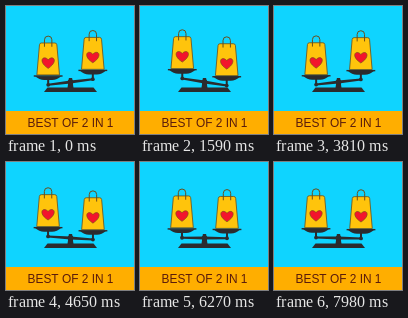
These frames come from a looping animation (128x128 px, 8000 ms). An HTML page with a canvas:

```html
<!DOCTYPE html>
<html lang="en">
<head>
<meta charset="utf-8">
<title>Best of 2 in 1</title>
<style>
  html, body { margin: 0; width: 100%; height: 100%; overflow: hidden; background: #0fd4ff; }
  canvas { display: block; width: 100vw; height: 100vh; }
</style>
</head>
<body>
<canvas id="stage"></canvas>
<script>
const SIZE = 128, LOOP = 8000, STEP = 30;
const SKY = '#0fd4ff', BAR = '#ffae00', INK = '#2b2b2e', TEXT = '#5a1c0c';
const BAG = '#ffc40c', EDGE = '#6a4f1a', HEART = '#f3142c';
const PIVOT = { x: 64.5, y: 76 }, ARM = 22.5;
const PERIOD = 3520, PEAK = 1830;

const canvas = document.getElementById('stage');
const ctx = canvas.getContext('2d');

function poly(points, fill) {
  ctx.beginPath();
  points.forEach(([x, y]) => ctx.lineTo(x, y));
  ctx.closePath();
  ctx.fillStyle = fill;
  ctx.fill();
}

function disc(x, y, r, fill) {
  ctx.beginPath();
  ctx.arc(x, y, r, 0, Math.PI * 2);
  ctx.fillStyle = fill;
  ctx.fill();
}

function handle() {
  ctx.beginPath();
  ctx.moveTo(-3.7, -28.5);
  ctx.lineTo(-3.7, -35.5);
  ctx.arc(0, -35.5, 3.7, Math.PI, 0);
  ctx.lineTo(3.7, -28.5);
  ctx.lineWidth = 1;
  ctx.stroke();
}

function heart(x, y) {
  ctx.beginPath();
  ctx.moveTo(x, y + 5.6);
  ctx.bezierCurveTo(x - 11, y - 1.5, x - 5, y - 8.5, x, y - 3);
  ctx.bezierCurveTo(x + 5, y - 8.5, x + 11, y - 1.5, x, y + 5.6);
  ctx.fillStyle = HEART;
  ctx.fill();
  ctx.lineWidth = 0.6;
  ctx.stroke();
}

// The origin is the middle of the bag's bottom edge.
function bag() {
  ctx.strokeStyle = EDGE;
  ctx.beginPath();
  ctx.moveTo(-11.3, -0.4);
  ctx.lineTo(-8.7, -30.5);
  ctx.quadraticCurveTo(-8.5, -32.3, -6.7, -32.3);
  ctx.lineTo(6.7, -32.3);
  ctx.quadraticCurveTo(8.5, -32.3, 8.7, -30.5);
  ctx.lineTo(11.3, -0.4);
  ctx.closePath();
  ctx.fillStyle = BAG;
  ctx.fill();
  ctx.lineWidth = 0.8;
  ctx.stroke();
  handle();
  heart(0, -12.5);
}

function pan(x, y) {
  ctx.save();
  ctx.translate(x, y);
  ctx.fillStyle = INK;
  ctx.fillRect(-1, -6, 2, 6);
  ctx.fillRect(-14.4, -9.5, 28.8, 1.4);
  ctx.beginPath();
  ctx.moveTo(-13, -8.5);
  ctx.quadraticCurveTo(-9, -4.8, -4, -4.8);
  ctx.lineTo(4, -4.8);
  ctx.quadraticCurveTo(9, -4.8, 13, -8.5);
  ctx.fill();
  disc(0, 0, 1.9, INK);
  ctx.translate(0, -9.5);
  bag();
  ctx.restore();
}

function stand() {
  const { x, y } = PIVOT;
  poly([[x - 1.6, y - 4], [x + 1.6, y - 4], [x + 3, y + 6], [x - 3, y + 6]], INK);
  poly([[x - 23, y + 5.5], [x + 23, y + 5.5], [x + 26.5, y + 10], [x - 26.5, y + 10]], INK);
}

function beam(angle) {
  ctx.save();
  ctx.translate(PIVOT.x, PIVOT.y);
  ctx.rotate(angle);
  poly([[-ARM, -1], [0, -1.6], [ARM, -1], [ARM, 1], [0, 1.6], [-ARM, 1]], INK);
  disc(0, 0, 2.8, INK);
  ctx.restore();
}

// A positive angle lifts the left pan.
function tilt(t) {
  const wave = Math.cos((t - PEAK) / PERIOD * Math.PI * 2);
  return (1.3 + 8.5 * wave) * Math.PI / 180;
}

function caption() {
  ctx.fillStyle = BAR;
  ctx.fillRect(0, 105, SIZE, 23);
  ctx.fillStyle = TEXT;
  ctx.font = '11.9px "Liberation Sans", Arial, sans-serif';
  ctx.textAlign = 'center';
  ctx.textBaseline = 'alphabetic';
  ctx.fillText('BEST OF 2 IN 1', 64.5, 121);
}

function draw(t) {
  const angle = tilt(t);
  const dx = ARM * Math.cos(angle), dy = ARM * Math.sin(angle);
  ctx.fillStyle = SKY;
  ctx.fillRect(0, 0, SIZE, SIZE);
  stand();
  beam(angle);
  pan(PIVOT.x - dx, PIVOT.y - dy);
  pan(PIVOT.x + dx, PIVOT.y + dy);
  caption();
}

function resize() {
  const ratio = window.devicePixelRatio || 1;
  canvas.width = Math.round(innerWidth * ratio);
  canvas.height = Math.round(innerHeight * ratio);
  ctx.setTransform(canvas.width / SIZE, 0, 0, canvas.height / SIZE, 0, 0);
}

function tick() {
  const t = performance.now() % LOOP;
  draw(Math.floor(t / STEP) * STEP);
  requestAnimationFrame(tick);
}

addEventListener('resize', resize);
resize();
tick();
</script>
</body>
</html>
```
